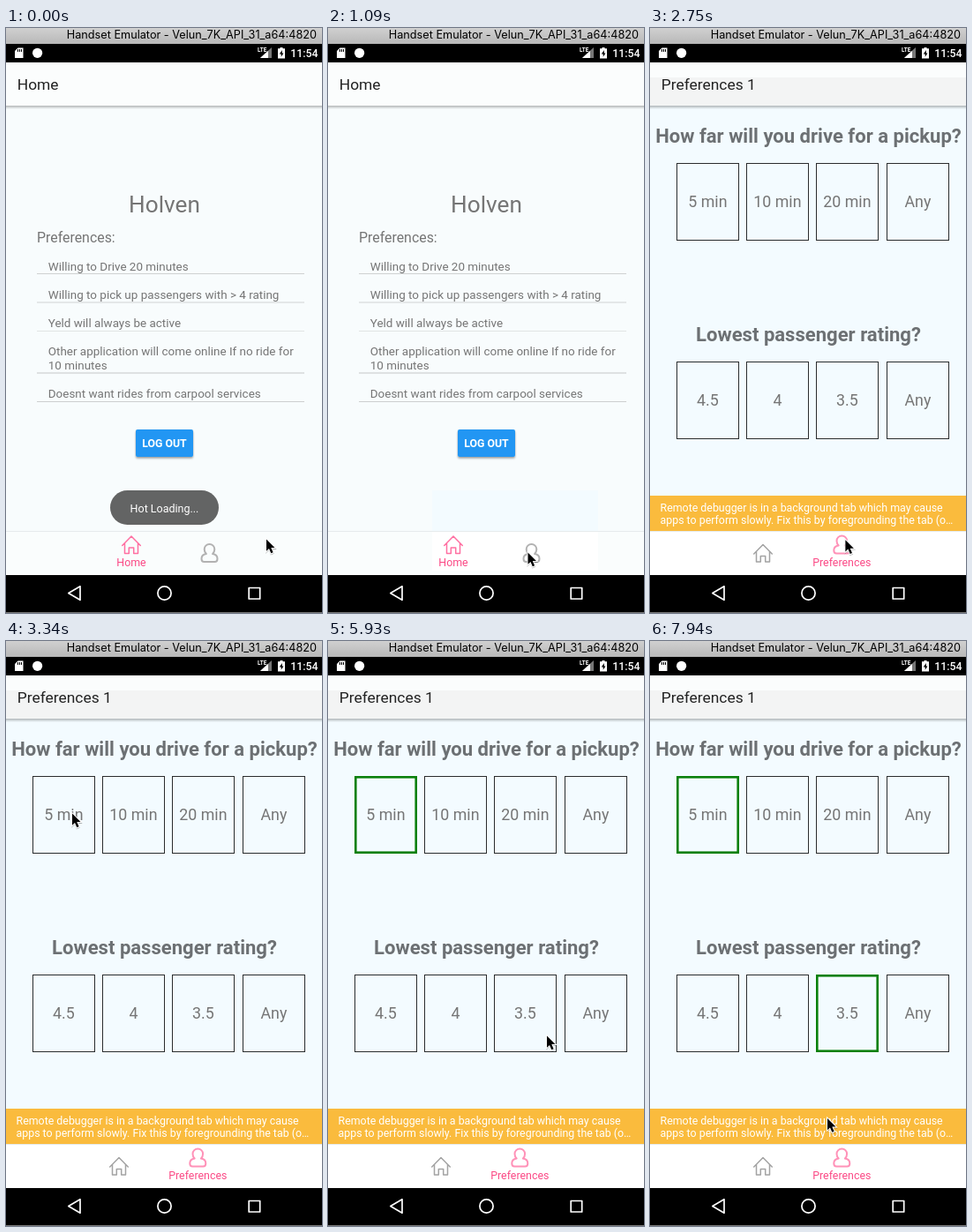
An HTML page that plays this animation: 358x663 px, repeating every 8000 ms.

```html
<!DOCTYPE html>
<html lang="en">
<head>
<meta charset="utf-8">
<title>Ride preferences</title>
<style>
  html, body { margin: 0; width: 100%; height: 100%; overflow: hidden; background: #000; }
  svg { display: block; width: 358px; height: 663px; font-family: Roboto, sans-serif; }
  .mid { text-anchor: middle; }
  .end { text-anchor: end; }
  .bar { font-size: 17.4px; fill: #222; }
  .item { font-size: 13.45px; fill: #757575; }
  .ask { font-size: 22.05px; font-weight: 700; fill: #6c7073; }
  .opt { font-size: 17.8px; fill: #757575; }
  .tab { font-size: 12.4px; fill: #fb4a86; }
  .warn { font-size: 12.4px; fill: #fff; }
  .line { fill: none; stroke-linejoin: round; stroke-linecap: round; }
</style>
</head>
<body>
<svg viewBox="0 0 358 663" xmlns="http://www.w3.org/2000/svg">
  <defs>
    <linearGradient id="chrome" x2="0" y2="1">
      <stop offset="0" stop-color="#d0d0d0"/><stop offset="1" stop-color="#b8b8b8"/>
    </linearGradient>
    <linearGradient id="shade" x2="0" y2="1">
      <stop offset="0" stop-color="#000" stop-opacity=".28"/><stop offset="1" stop-color="#000" stop-opacity="0"/>
    </linearGradient>
    <filter id="soft" x="-20%" y="-30%" width="140%" height="180%">
      <feDropShadow dx="0" dy="1.6" stdDeviation="1.3" flood-opacity=".4"/>
    </filter>
    <filter id="lift" x="-50%" y="-50%" width="200%" height="200%">
      <feDropShadow dx="0" dy="1" stdDeviation=".7" flood-opacity=".3"/>
    </filter>
    <path id="house" class="line" d="M-10.3 1 0-9.5 10.3 1M-7.5-1.4V10H-2.7V3.5H2.7V10H7.5V-1.4"/>
    <path id="person" class="line" d="M-3.6 1C-5.2-.5-5.8-2.5-5.8-4.3A5.8 5.8 0 0 1 5.8-4.3C5.8-2.5 5.2-.5 3.6 1C7 1.5 9 3.3 9 6.5Q9 10 6 10H-6Q-9 10-9 6.5C-9 3.3-7 1.5-3.6 1Z"/>
  </defs>

  <!-- window title and status bar -->
  <rect width="358" height="663"/>
  <rect width="358" height="18" fill="url(#chrome)"/>
  <text class="end" x="352" y="12" font-size="12.7" font-family="Inter, sans-serif">Handset Emulator - Velun_7K_API_31_a64:4820</text>
  <path fill="#fff" d="M13.5 22.5H19.5V34H10V26Z"/>
  <path stroke="#000" d="M13.5 24V27M15.5 24V27M17.5 24V27"/>
  <circle cx="35.6" cy="28.3" r="5.6" fill="#fff"/>
  <path fill="#777" d="M301 22V34H288Z"/>
  <path fill="#fff" d="M297 25.7V34H288Z"/>
  <text x="285" y="27" font-size="6.3" font-weight="700" fill="#fff">LTE</text>
  <path fill="#fff" d="M310.5 22H313.5V23.3H316V34.5H308V23.3H310.5Z"/>
  <path d="M312.8 25 309.8 29.6H311.7V32.8L314.5 28.4H312.8Z"/>
  <text class="end" x="353.5" y="33" font-size="12.3" font-weight="500" fill="#fff">11:54</text>

  <!-- home screen -->
  <g id="home">
    <rect y="39" width="358" height="581" fill="#f8fcfd"/>
    <rect y="39" width="358" height="49" fill="#fbfdfd"/>
    <text class="bar" x="12.8" y="70">Home</text>
    <text class="mid" x="179.5" y="209" font-size="26.2" fill="#757575">Holven</text>
    <text x="35" y="242.5" font-size="15.9" fill="#757575">Preferences:</text>
    <g id="list"></g>
    <g filter="url(#soft)"><rect x="147" y="455" width="65" height="31" rx="2" fill="#2196f3"/></g>
    <text class="mid" x="179.5" y="475" font-size="12.3" font-weight="700" fill="#fff">LOG OUT</text>
    <rect y="570" width="358" height="50" fill="#fafdfd"/>
    <g id="patch">
      <rect x="118" y="524" width="188" height="46" fill="#f3fbff"/>
      <rect x="118" y="570" width="188" height="45" fill="#fff"/>
    </g>
    <g id="toast">
      <rect x="118" y="524" width="123" height="39" rx="19.5" fill="#636464"/>
      <text class="mid" x="179.5" y="548.7" font-size="12.5" fill="#fff">Hot Loading...</text>
    </g>
  </g>

  <!-- preferences screen -->
  <g id="prefs">
    <rect y="39" width="358" height="581" fill="#f3fbff"/>
    <rect y="39" width="358" height="17" fill="#fbfdfd"/>
    <rect y="56" width="358" height="32" fill="#f3f4f4"/>
    <text class="bar" x="12.8" y="70">Preferences 1</text>
    <text class="ask mid" x="179.5" y="129.5">How far will you drive for a pickup?</text>
    <text class="ask mid" x="179.5" y="355">Lowest passenger rating?</text>
    <g id="boxes"></g>
    <rect y="530" width="358" height="40" fill="#fabb3d"/>
    <text class="warn" x="11.5" y="547.5">Remote debugger is in a background tab which may cause</text>
    <text class="warn" x="11.5" y="561.5">apps to perform slowly. Fix this by foregrounding the tab (o…</text>
    <rect y="570" width="358" height="50" fill="#fff"/>
  </g>

  <rect y="88" width="358" height="4" fill="url(#shade)"/>
  <rect y="570" width="358" height="1" fill="#e6ebed"/>

  <!-- tabs -->
  <g id="tabHome">
    <use href="#house" x="142" y="585.5" stroke="#ff70a2" stroke-width="1.5"/>
    <text class="tab mid" x="142" y="609.5">Home</text>
    <use href="#person" x="230.5" y="595" stroke="#b2b2b2" stroke-width="2"/>
  </g>
  <g id="tabPrefs">
    <use href="#house" x="128" y="595" stroke="#a3a3a3" stroke-width="1.5"/>
    <use href="#person" x="217.3" y="585.5" stroke="#ff92b8" stroke-width="2"/>
    <text class="tab mid" x="217.3" y="609.5">Preferences</text>
  </g>

  <!-- system navigation -->
  <g class="line" stroke="#fff" stroke-width="1.7">
    <path d="M70.8 640.5 84 632.8V648.2Z"/>
    <circle cx="179.5" cy="640.5" r="7.6"/>
    <rect x="275.2" y="634.5" width="12.5" height="12.5"/>
  </g>
  <rect y="662" width="358" height="1" fill="#777"/>

  <g id="cursor" filter="url(#lift)">
    <path d="M0 0V13.2L3 10.4 5.3 15.8 7.6 14.8 5.3 9.5H9.5Z" stroke="#fff" stroke-width="1.8" paint-order="stroke"/>
  </g>
</svg>
<script>
  const LOOP = 8000;
  const $ = id => document.getElementById(id);

  function set(el, attrs) {
    for (const k in attrs) el.setAttribute(k, attrs[k]);
    return el;
  }

  function add(parent, tag, attrs, text = '') {
    const el = set(document.createElementNS('http://www.w3.org/2000/svg', tag), attrs);
    el.textContent = text;
    parent.append(el);
    return el;
  }

  // [baseline, text]
  [
    [274.5, 'Willing to Drive 20 minutes'],
    [306.8, 'Willing to pick up passengers with > 4 rating'],
    [339, 'Yeld will always be active'],
    [371, 'Other application will come online If no ride for'],
    [387, '10 minutes'],
    [419, 'Doesnt want rides from carpool services']
  ].forEach(([y, s]) => add($('list'), 'text', { class: 'item', x: 47.8, y }, s));

  // [top, colour]
  [[278, '#cfd1d1'], [310.5, '#d2d4d4'], [343, '#e1e4e4'], [390.5, '#c6c8c8'], [423, '#cdcfcf']]
    .forEach(([y, fill]) => add($('list'), 'rect', { x: 35, y, width: 303, height: 1, fill }));

  // The border always grows inward from the same outer edge.
  function mark({ el, x, y }, on) {
    const w = on ? 2.6 : 1;
    set(el, {
      x: x + w / 2, y: y + w / 2, width: 71 - w, height: 88 - w,
      stroke: on ? '#0a800a' : '#2a2c2d', 'stroke-width': w
    });
  }

  function optionRow(y, labels) {
    return labels.map((label, i) => {
      const x = Math.round(30 + i * 79.2);
      const box = { x, y, el: add($('boxes'), 'rect', { fill: 'none' }) };
      add($('boxes'), 'text', { class: 'opt mid', x: x + 35.4, y: y + 49.6 }, label);
      mark(box, false);
      return box;
    });
  }
  const far = optionRow(153, ['5 min', '10 min', '20 min', 'Any']);
  const rating = optionRow(378, ['4.5', '4', '3.5', 'Any']);

  // pointer moves: [first step, last step, steps, x, y]
  const start = [295, 579.5];
  const moves = [
    [110, 110, 1, 295.5, 580.5],
    [350, 640, 5, 273.5, 598],
    [940, 1090, 3, 226.5, 594.5],
    [2750, 3270, 9, 77, 178],
    [3340, 3340, 1, 75, 195.5],
    [3395, 3450, 2, 75, 199],
    [3750, 3810, 2, 75, 201.5],
    [4770, 4770, 1, 75, 202],
    [4830, 4890, 2, 78, 208],
    [5190, 5730, 9, 255, 426],
    [5930, 5930, 1, 248, 447.5],
    [6470, 6530, 2, 255, 448.5],
    [7000, 7590, 10, 220, 544],
    [7830, 7940, 3, 201, 541]
  ];

  const ease = p => p * p * (3 - 2 * p);

  function pointer(t) {
    let [x, y] = start;
    for (const [a, b, n, tx, ty] of moves) {
      if (t < a) break;
      const gap = n > 1 ? (b - a) / (n - 1) : 1;
      const done = Math.min(n, Math.floor((t - a) / gap + 1e-6) + 1);
      const p = ease(done / n);
      x += (tx - x) * p;
      y += (ty - y) * p;
    }
    return [x, y];
  }

  const fade = [[350, .85], [422, .65], [495, .45], [567, .3], [640, .15], [940, .08], [1015, .03], [1090, 0]];
  const toastAlpha = t => fade.reduce((v, [at, a]) => t >= at ? a : v, 1);

  const show = (id, on) => { $(id).style.display = on ? '' : 'none'; };

  function draw(t) {
    show('home', t < 1980);
    show('prefs', t >= 1980);
    show('patch', t >= 350);
    show('tabHome', t < 2340);
    show('tabPrefs', t >= 2340);
    set($('toast'), { opacity: toastAlpha(t) });
    mark(far[0], t >= 5190);
    mark(rating[2], t >= 6170);
    set($('cursor'), { transform: `translate(${pointer(t)})` });
  }

  const began = performance.now();
  function tick() {
    draw((performance.now() - began) % LOOP);
    requestAnimationFrame(tick);
  }
  draw(0);
  requestAnimationFrame(tick);
</script>
</body>
</html>
```
